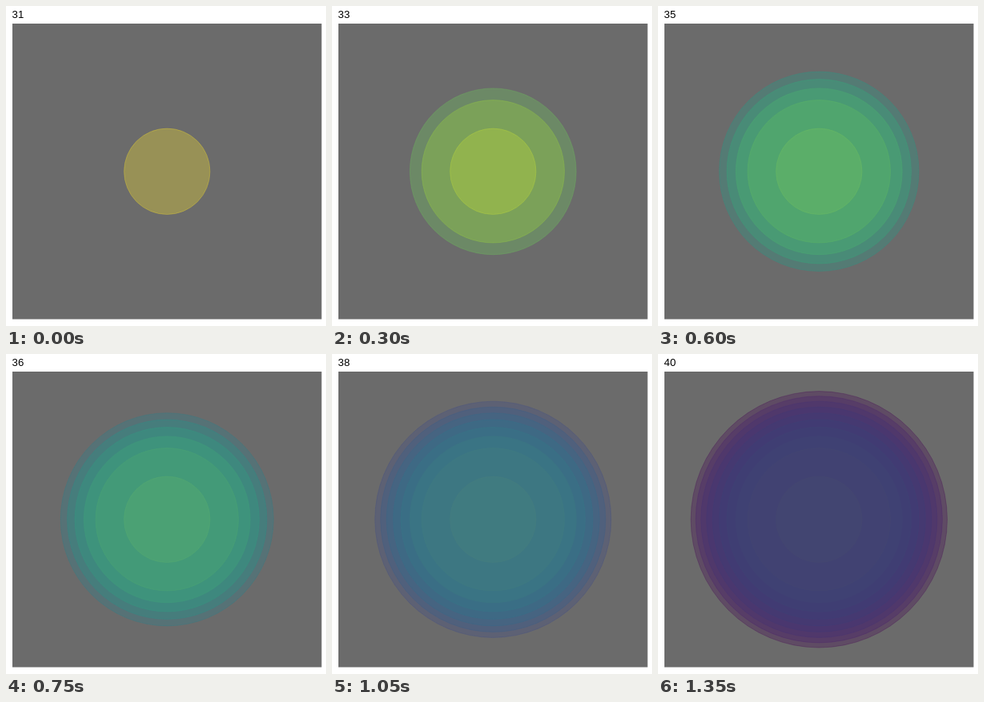
Write an HTML page with a canvas that moves like this. It is 400 px wide and 400 px high and loops after 1.5 s.

```html
<!DOCTYPE html>
<html>
<head>
<meta charset="utf-8">
<style>
  html, body { margin: 0; width: 100%; height: 100%; overflow: hidden; background: #fff; }
  canvas { display: block; }
</style>
</head>
<body>
<canvas width="400" height="400"></canvas>
<script>
const ctx = document.querySelector('canvas').getContext('2d');
const STEP = 150;
const COLORS = ['#fde725', '#b4de2c', '#6dcd59', '#35b779', '#1f9e89',
                '#26828e', '#31688e', '#3e4a89', '#482878', '#440154'];

// Radius grows with the square root of the index
function disc(i) {
  ctx.beginPath();
  ctx.arc(201.3, 206.8, 53.7 + 35.5 * Math.sqrt(i), 0, 2 * Math.PI);
  ctx.fillStyle = ctx.strokeStyle = COLORS[i];
  ctx.fill();
  ctx.stroke();
}

function draw(step) {
  ctx.globalAlpha = 1;
  ctx.fillStyle = '#fff';
  ctx.fillRect(0, 0, 400, 400);
  ctx.fillStyle = '#6b6b6b';
  ctx.fillRect(8, 22, 386.5, 369.5);
  ctx.fillStyle = '#000';
  ctx.font = '13.2px "Liberation Sans", Arial, sans-serif';
  ctx.fillText(31 + step, 7.6, 15);
  ctx.globalAlpha = 0.3;
  ctx.lineWidth = 0.94;
  for (let i = 0; i <= step; i++) disc(i);
}

function tick() {
  draw(Math.floor(performance.now() / STEP) % COLORS.length);
  requestAnimationFrame(tick);
}
tick();
</script>
</body>
</html>
```
